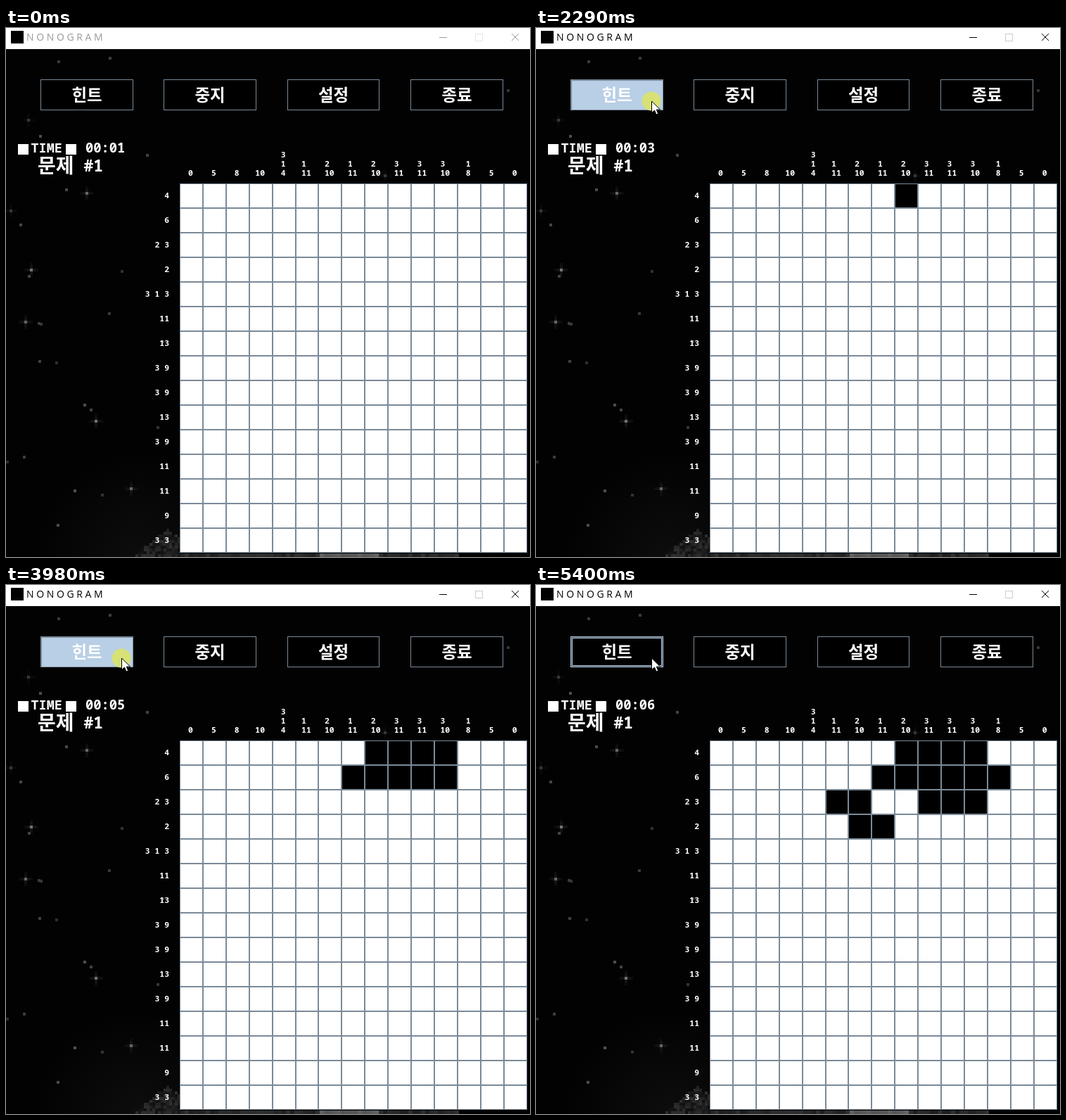
Animation, 745 px wide and 752 px high, one loop 5.47 s. Source, as an HTML page with a canvas:

```html
<!DOCTYPE html>
<html lang="ko">
<head>
<meta charset="utf-8">
<title>NONOGRAM</title>
<style>
  html, body { margin: 0; width: 100%; height: 100%; overflow: hidden; background: #000; }
  canvas { display: block; }
</style>
</head>
<body>
<canvas id="stage" width="745" height="752"></canvas>
<script>
const ctx = document.getElementById('stage').getContext('2d');
const LOOP = 5470, TICK = 67.5;
const STEEL = '#7a8a99', SKY = '#b8cfe5';
const MONO = '"Noto Sans Mono", "DejaVu Sans Mono", monospace';
const HANGUL = '"Noto Sans CJK KR", "Noto Sans CJK", "Noto Sans CJK JP", sans-serif';
const LATIN = '"Open Sans", "Noto Sans", sans-serif';

const GRID = { x: 247, y: 221, w: 32.9, h: 35, n: 15 };
const columnHints = '0|5|8|10|3 1 4|1 11|2 10|1 11|2 10|3 11|3 11|3 10|1 8|5|0'.split('|');
const rowHints = '4|6|2 3|2|3 1 3|11|13|3 9|3 9|13|3 9|11|11|9|3 3'.split('|');

// Each row is solved left to right; the lengths of its runs come from its hint.
const runStarts = [[8], [7], [5, 9], [6]];
const reveal = runStarts.flatMap((starts, row) => starts.flatMap((start, i) =>
  Array.from({ length: rowHints[row].split(' ')[i] }, (_, k) => [start + k, row])));

// Bursts of evenly spaced clicks, in ticks.
const bursts = [
  { first: 28, step: 0, count: 1, hold: 1 },
  { first: 34, step: 3, count: 4, hold: 2 },
  { first: 48, step: 2.68, count: 6, hold: 1 },
  { first: 65, step: 2.52, count: 6, hold: 1 },
];
const clicks = bursts.flatMap(({ first, step, count, hold }) =>
  Array.from({ length: count }, (_, i) => {
    const down = Math.round(first + i * step);
    return { down, up: down + hold };
  }));

function rect(x, y, w, h, color) {
  ctx.fillStyle = color;
  ctx.fillRect(x, y, w, h);
}

function frame(x, y, w, h, color) {
  ctx.strokeStyle = color;
  ctx.lineWidth = 1;
  ctx.strokeRect(x + 0.5, y + 0.5, w - 1, h - 1);
}

function text(string, x, y, font, color = '#fff', align = 'left') {
  ctx.font = font;
  ctx.fillStyle = color;
  ctx.textAlign = align;
  ctx.fillText(string, x, y);
}

function line(color, x1, y1, x2, y2) {
  ctx.strokeStyle = color;
  ctx.lineWidth = 1;
  ctx.beginPath();
  ctx.moveTo(x1, y1);
  ctx.lineTo(x2, y2);
  ctx.stroke();
}

function seeded(seed) {
  return () => (seed = seed * 16807 % 2147483647) / 2147483647;
}

const gray = (level, alpha = 1) => `rgba(${level},${level},${level},${alpha})`;

function drawStar(x, y, light) {
  for (const reach of [10, 6]) {
    rect(x - reach, y - 2, 2 * reach, 4, gray(70, light * 0.25));
    rect(x - 2, y - reach, 4, 2 * reach, gray(70, light * 0.25));
  }
  rect(x - 2, y - 2, 4, 4, gray(170, light));
}

function drawSky() {
  const random = seeded(97);
  rect(0, 0, 745, 752, '#020202');
  const glow = ctx.createRadialGradient(190, 752, 0, 190, 752, 150);
  glow.addColorStop(0, '#0d0d0d');
  glow.addColorStop(1, 'rgba(13,13,13,0)');
  rect(40, 600, 300, 152, glow);

  for (let i = 0; i < 18; i++)
    rect(Math.round(random() * 240), Math.round(220 + random() * 520), 4, 4, gray(45 + i * 2));
  for (let i = 0; i < 9; i++)
    rect(Math.round(random() * 740), Math.round(32 + random() * 180), 4, 4, gray(45 + i * 4));
  [[115, 235], [36, 344], [28, 418], [128, 559], [178, 655]]
    .forEach(([x, y], i) => drawStar(x, y, i % 2 ? 0.6 : 0.5));
  [[32, 131], [7, 260], [539, 210]].forEach(([x, y]) => drawStar(x, y, 0.25));

  // Blocky hill below the row hints, and the strip of ground under the grid.
  for (let x = 180; x < 248; x += 4) {
    const top = Math.round((712 + Math.abs(x - 228) * 0.8) / 4) * 4;
    for (let y = top; y < 752; y += 4)
      rect(x, y, 4, 4, gray(Math.round(14 + random() * 34)));
  }
  for (let x = 248; x < 640; x += 6) {
    const level = x > 440 && x < 526 ? 80 : 28;
    rect(x, 747, 6, 5, gray(Math.round(level + random() * 20)));
  }
}

function drawTitleBar(active) {
  const ink = active ? '#000' : '#999';
  rect(0, 0, 745, 30, '#fff');
  rect(7, 4, 18, 18, '#000');
  text('N O N O G R A M', 29, 18, `14px ${LATIN}`, ink);
  line(ink, 616, 13.5, 627, 13.5);
  frame(667, 8, 11, 11, active ? '#ccc' : '#e6e6e6');
  line(ink, 719, 8, 729, 18);
  line(ink, 729, 8, 719, 18);
}

function drawButton(label, index, state) {
  const x = Math.round(49 + index * 175.3);
  const w = Math.round(180.65 + index * 175.3) - x;
  const y = 73, h = 44;
  rect(x, y, w, h, state === 'pressed' ? SKY : '#000');
  if (state === 'hover') {
    [SKY, '#3a4450', SKY].forEach((c, i) => frame(x + i, y + i, w - 2 * i, h - 2 * i, c));
  } else {
    frame(x, y, w, h, STEEL);
    if (state === 'pressed') {
      rect(x, y, w, 2, STEEL);
      rect(x, y, 2, h, STEEL);
    }
  }
  text(label, x + w / 2, 103.5, `bold 23.5px ${HANGUL}`, '#fff', 'center');
}

function drawStatus(second) {
  rect(17, 165, 15, 15, '#fff');
  rect(85, 165, 15, 15, '#fff');
  text('TIME', 35.5, 177, `600 18.5px ${MONO}`);
  text('00:0' + second, 113, 177, `600 18.8px ${MONO}`);
  text('문제', 45, 205.5, `bold 28px ${HANGUL}`);
  text('#1', 110.5, 204, `bold 23px ${MONO}`);
}

function drawHints() {
  const font = `600 11.4px ${MONO}`;
  columnHints.forEach((hint, col) => {
    const lines = hint.split(' ');
    const center = GRID.x + (col + 0.5) * GRID.w - 1;
    const left = center - Math.max(...lines.map(s => s.length)) * 3.42;
    lines.reverse().forEach((s, i) => text(s, left, 210 - i * 13, font));
  });
  rowHints.forEach((hint, row) => text(hint, 232, 242 + row * GRID.h, font, '#fff', 'right'));
}

function drawCell(col, row, color) {
  const edge = c => Math.round(GRID.x + c * GRID.w);
  const x = edge(col), y = GRID.y + row * GRID.h, w = edge(col + 1) - x;
  rect(x, y, w, GRID.h, color);
  frame(x, y, w, GRID.h, STEEL);
}

function drawGrid(filled) {
  for (let row = 0; row < GRID.n; row++)
    for (let col = 0; col < GRID.n; col++) drawCell(col, row, '#fff');
  reveal.slice(0, filled).forEach(([col, row]) => drawCell(col, row, '#000'));
}

// The pointer glides up from the bottom edge, rests, then slides onto the first button.
function pointerAt(tick) {
  if (tick < 5) return null;
  if (tick < 13) {
    const rest = (1 - (tick - 5) / 7) ** 1.6;
    return { x: 186 + 83 * rest, y: 129 + 603 * rest };
  }
  const p = Math.min(1, Math.max(0, (tick - 17) / 6));
  return { x: 184 - 20 * p, y: 117 - 13 * p };
}

function drawPointer({ x, y }, pressed) {
  if (pressed) {
    ctx.fillStyle = '#d7e176';
    ctx.beginPath();
    ctx.arc(x, y, 13.5, 0, 2 * Math.PI);
    ctx.fill();
  }
  ctx.save();
  ctx.translate(x + 0.5, y);
  ctx.fillStyle = '#fff';
  ctx.strokeStyle = '#000';
  ctx.lineWidth = 1;
  const arrow = new Path2D('M0 0V16.5L4 13L6.5 19L9.2 18L6.8 12H12Z');
  ctx.fill(arrow);
  ctx.stroke(arrow);
  ctx.restore();
}

function draw(time) {
  const tick = Math.floor((time + 18) / TICK);
  const done = clicks.filter(c => c.up <= tick).length;
  const pressed = clicks.some(c => c.down <= tick && tick < c.up);
  const pointer = pointerAt(tick);
  const hover = pointer && pointer.x < 181 && pointer.y < 117;

  drawSky();
  drawTitleBar(tick >= clicks[0].down);
  ['힌트', '중지', '설정', '종료'].forEach((label, i) =>
    drawButton(label, i, i === 0 && (pressed ? 'pressed' : hover && 'hover')));
  drawStatus(Math.floor(time / 1000 + 1.53));
  drawHints();
  drawGrid(done);
  if (pointer) drawPointer(pointer, pressed);
}

function loop() {
  draw(performance.now() % LOOP);
  requestAnimationFrame(loop);
}
loop();
</script>
</body>
</html>
```
